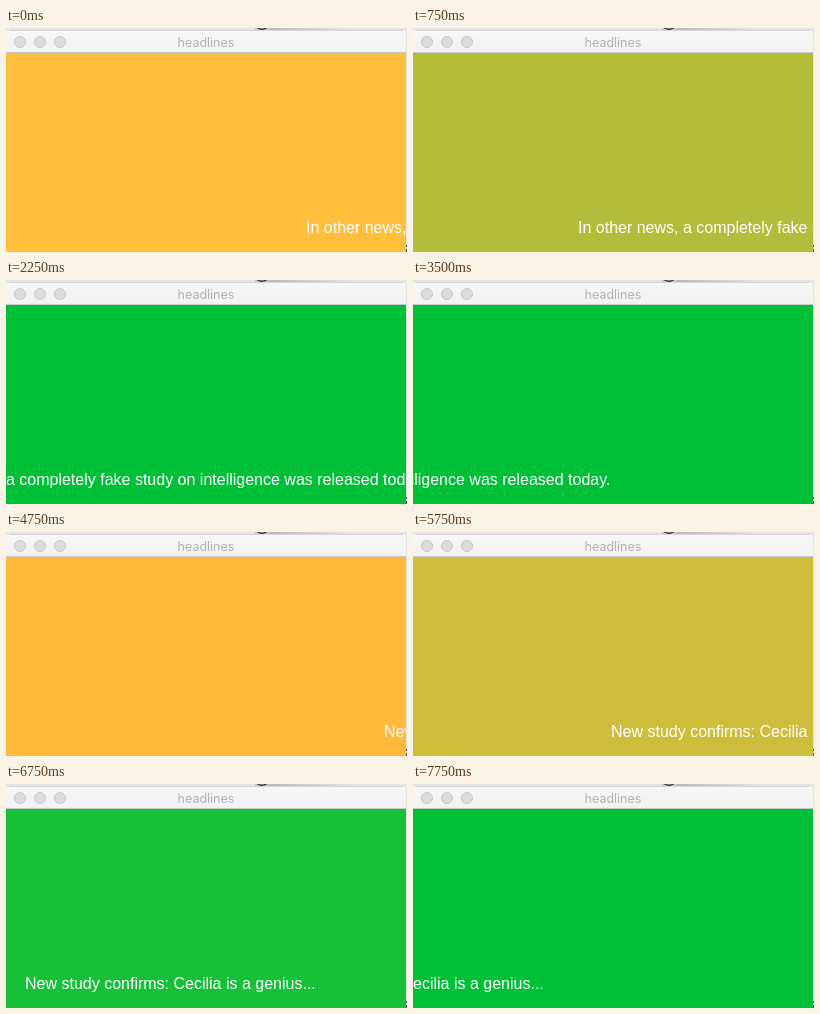
Animation, 401 px wide and 224 px high, one loop 8 s. Source, as an HTML page:

```html
<!DOCTYPE html>
<html lang="en">
<head>
<meta charset="utf-8">
<title>headlines</title>
<style>
  html, body { margin: 0; width: 100%; height: 100%; overflow: hidden; background: #ddd; }
  svg { display: block; width: 401px; height: 224px; }
  .title { font: 12.5px Inter, sans-serif; fill: #b3b3b3; text-anchor: middle; }
  .news { font: 16px "Liberation Sans", Arial, sans-serif; fill: #fff; white-space: pre; }
</style>
</head>
<body>
<svg viewBox="0 0 401 224">
  <defs>
    <linearGradient id="bar" x2="0" y2="1">
      <stop stop-color="#f7f7f7"/><stop offset="1" stop-color="#f2f2f2"/>
    </linearGradient>
    <linearGradient id="desk">
      <stop stop-color="#b8b8b8"/><stop offset="1" stop-color="#e4e4e4"/>
    </linearGradient>
    <clipPath id="view"><rect y="25" width="400" height="199"/></clipPath>
  </defs>

  <!-- desktop behind the window -->
  <rect width="401" height="224" fill="#e4e4e4"/>
  <rect x="264" width="80" height="3" fill="url(#desk)"/>
  <rect x="249" width="15" height="2" fill="#c4c4c4"/>
  <path d="M251.500 0Q256 2.500 260.500 0" fill="none" stroke="#333" stroke-width="1.300"/>
  <path d="M400.500 217v2m0 2v3" stroke="#555"/>

  <!-- title bar -->
  <path d="M0 24V5Q0 2 3 2H397Q400 2 400 5V24Z" fill="url(#bar)"/>
  <path d="M3 2.500H397" stroke="#d6d6d6"/>
  <g fill="#dcdcdc" stroke="#c9c9c9">
    <circle cx="14" cy="14" r="5.500"/>
    <circle cx="34" cy="14" r="5.500"/>
    <circle cx="54" cy="14" r="5.500"/>
  </g>
  <text class="title" x="200" y="19">headlines</text>
  <path d="M0 24.500H400" stroke="#c6c8cc"/>

  <!-- sketch -->
  <g clip-path="url(#view)">
    <rect id="back" y="25" width="400" height="199"/>
    <text id="news" class="news" y="205"></text>
  </g>
</svg>
<script>
  const STEP = 250, STEPS = 32;
  const back = document.getElementById('back');
  const news = document.getElementById('news');

  // Each headline: first step, text, and [step, x] points of its scroll.
  const headlines = [
    { from: 0, text: 'In other news, a completely fake study on intelligence was released today.',
      path: [[0, 300], [10, -150], [18, -504]] },
    { from: 19, text: 'New study confirms: Cecilia is a genius...',
      path: [[19, 378], [25, 108], [31, -160]] }
  ];

  // Background colour follows the text position: [x, r, g, b].
  const colours = [
    [0, 0, 192, 56], [108, 125, 191, 58], [165, 178, 190, 59],
    [255, 255, 191, 60], [300, 255, 190, 60], [378, 255, 184, 58]
  ];

  // Piecewise linear lookup, clamped at both ends.
  function sample(points, t, col = 1) {
    if (t <= points[0][0]) return points[0][col];
    for (let i = 1; i < points.length; i++) {
      const a = points[i - 1], b = points[i];
      if (t <= b[0]) return a[col] + (b[col] - a[col]) * (t - a[0]) / (b[0] - a[0]);
    }
    return points[points.length - 1][col];
  }

  let shown = -1;
  function draw(now) {
    const step = Math.floor(now / STEP) % STEPS;
    if (step !== shown) {
      shown = step;
      const line = headlines[step < headlines[1].from ? 0 : 1];
      const x = Math.round(sample(line.path, step));
      const rgb = [1, 2, 3].map(c => Math.round(sample(colours, x, c)));
      news.textContent = line.text;
      news.setAttribute('x', x);
      back.setAttribute('fill', `rgb(${rgb})`);
    }
  }

  const start = performance.now();
  function tick() {
    draw(performance.now() - start);
    requestAnimationFrame(tick);
  }
  tick();
</script>
</body>
</html>
```
